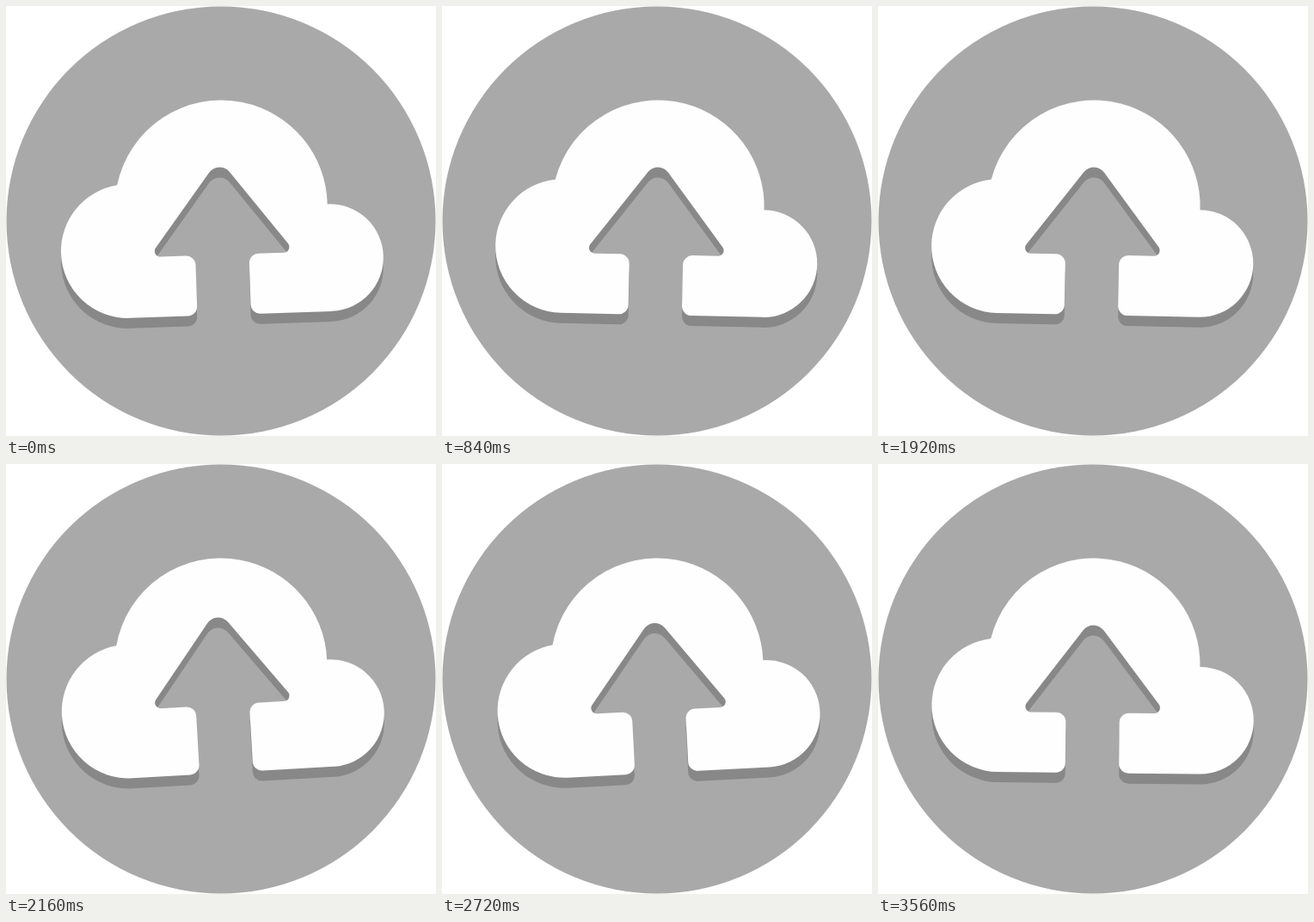
Recreate the animation shown at these times as an HTML page with a canvas. Size 500 px wide and 500 px high, loop 3600 ms.

```html
<!DOCTYPE html>
<html lang="en">
<head>
<meta charset="utf-8">
<title>Cloud upload</title>
<style>
  html, body { margin: 0; width: 100%; height: 100%; overflow: hidden; background: #fff; }
  canvas { display: block; width: 500px; height: 500px; }
</style>
</head>
<body>
<canvas id="stage" width="500" height="500"></canvas>
<script>
const ctx = document.getElementById('stage').getContext('2d');
const LOOP = 3600, STEP = 40, CENTER = 250;
const COLORS = { disc: '#a9a9a9', shadow: '#888888', cloud: '#fefefe' };

// [time in ms, value]
const SWING = [[-580, -9.2], [170, -0.95], [920, 1.3], [1670, 3.5], [2420, -5.8], [3170, 2.4], [3920, -1]];
const LIFT = [[0, 0], [400, 26.5], [800, 0], [2000, 0], [2400, 26.5], [2800, 0], [3600, 0]];

const left = { x: 140.6, y: 281.4, r: 77.8 };
const top_ = { x: 250.8, y: 233, r: 123.5 };
const right = { x: 375, y: 296.9, r: 62.3 };
const FLOOR = 359.2;

function valueAt(keys, time) {
  const i = Math.max(1, keys.findIndex(([t]) => t > time));
  const [t0, v0] = keys[i - 1], [t1, v1] = keys[i];
  const p = (time - t0) / (t1 - t0);
  return v0 + (v1 - v0) * (1 - Math.cos(Math.PI * p)) / 2;
}

// Angle on circle a of its crossing with circle b; side picks which crossing.
function crossing(a, b, side) {
  const dx = b.x - a.x, dy = b.y - a.y, d = Math.hypot(dx, dy);
  const spread = Math.acos((a.r * a.r + d * d - b.r * b.r) / (2 * a.r * d));
  return Math.atan2(dy, dx) + side * spread;
}

function cloudPath(lift) {
  const base = 289.2 - lift, apex = 177.75 - lift;
  const half = (base - apex) * 0.762;
  const stemL = 218.8, stemR = 281.2;
  const path = new Path2D();
  const lobe = (c, from, to) => path.arc(c.x, c.y, c.r, from, to);

  lobe(left, Math.PI / 2, crossing(left, top_, -1));
  lobe(top_, crossing(top_, left, 1), crossing(top_, right, -1));
  lobe(right, crossing(right, top_, 1), Math.PI / 2);

  const corners = [
    [stemR, FLOOR, 11], [stemR, base, 11], [CENTER + half, base, 6.5],
    [CENTER, apex, 15],
    [CENTER - half, base, 6.5], [stemL, base, 11], [stemL, FLOOR, 11],
    [left.x, FLOOR, 0]
  ];
  corners.slice(0, -1).forEach(([x, y, r], i) => {
    const [nextX, nextY] = corners[i + 1];
    path.arcTo(x, y, nextX, nextY, r);
  });
  path.closePath();
  return path;
}

function drawCloud(path, angle, drop, color) {
  ctx.save();
  ctx.translate(CENTER, CENTER + drop);
  ctx.rotate(angle * Math.PI / 180);
  ctx.translate(-CENTER, -CENTER);
  ctx.fillStyle = color;
  ctx.fill(path);
  ctx.restore();
}

function draw(now) {
  const time = Math.floor((now % LOOP) / STEP) * STEP;
  const angle = valueAt(SWING, time);
  const path = cloudPath(valueAt(LIFT, time));

  ctx.clearRect(0, 0, 500, 500);
  ctx.fillStyle = COLORS.disc;
  ctx.beginPath();
  ctx.arc(CENTER, CENTER, 249.5, 0, 2 * Math.PI);
  ctx.fill();
  drawCloud(path, angle, 12, COLORS.shadow);
  drawCloud(path, angle, 0, COLORS.cloud);
  requestAnimationFrame(draw);
}
draw(0);
</script>
</body>
</html>
```
